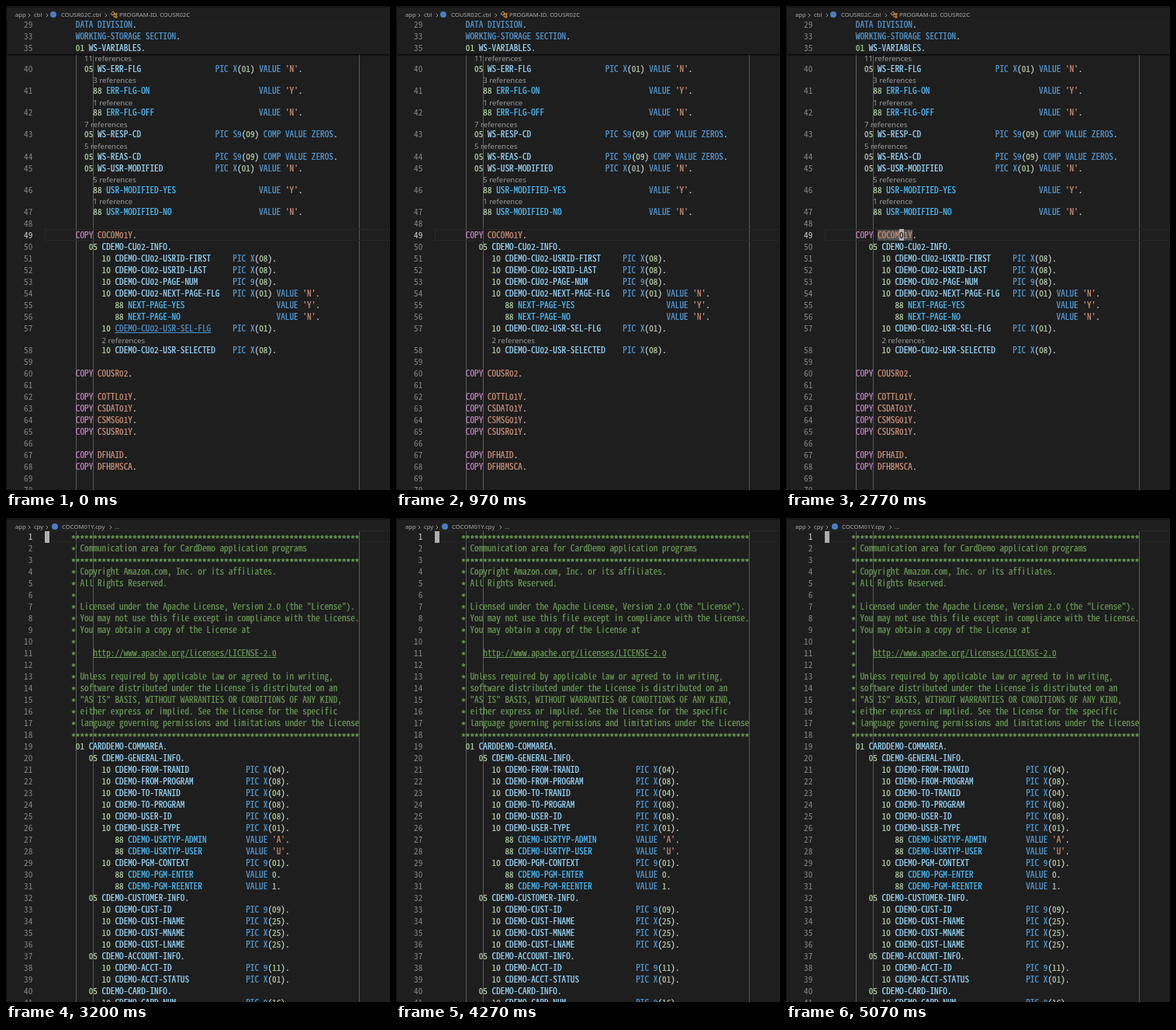
An HTML page for the animation above (5.3 s loop, 495 by 623 pixels).

```html
<!DOCTYPE html>
<html lang="en">
<head>
<meta charset="utf-8">
<title>COBOL editor</title>
<style>
html, body { margin: 0; width: 100%; height: 100%; overflow: hidden; background: #1e1e1e; }
#stage { position: relative; width: 495px; height: 623px; overflow: hidden; background: #1e1e1e; }
#stage div, #stage svg { position: absolute; white-space: pre; }
.view { inset: 0; }
.code, .num { height: 15px; line-height: 15px; color: #d4d4d4;
  font-family: "Noto Sans Mono CJK JP", "Noto Sans Mono CJK SC", "Noto Sans Mono CJK KR", "Noto Sans Mono", monospace;
  font-variant-ligatures: none; font-variant-numeric: lining-nums; font-kerning: none; }
.code { -webkit-text-stroke: .2px currentColor; }
.num { right: 460.7px; color: #858585; }
.num.on { color: #d0d0d0; }
.lens { height: 13px; font: 9.6px/13px "Noto Sans", "Open Sans", sans-serif; color: #999; }
.crumb { top: 4px; font: 7.7px/14px "Noto Sans", "Open Sans", sans-serif; color: #a9a9a9; }
.ruler { width: 1px; bottom: 0; background: #5a5a5a; }
.current { left: 50px; right: 0; height: 13px; border: 1px solid #272727; border-right: 0; }
.sticky { left: 2px; right: 0; top: 16px; height: 46px; background: #1e1e1e; box-shadow: 0 1px 2px #000; }
.dot { width: 8px; height: 8px; border-radius: 50%; background: #4a7cc2; }
.edge { left: 0; width: 1px; }
.word { height: 14px; background: #505050; }
.code.cursor { width: 5.6px; background: #aeafad; color: #1e1e1e; }
.kw { color: #569cd6 } .var { color: #9cdcfe } .const { color: #4fc1ff } .level { color: #b5cea8 }
.str { color: #ce9178 } .ctl { color: #c586c0 } .note { color: #6a9955 }
.note u, .link { text-decoration: underline; text-underline-offset: 1px; }
.star { position: relative; top: 3px; font-weight: bold; }
.menu { left: 145px; top: 273px; width: 223px; height: 380px; background: #1f1f1f; border: 1px solid #454545;
  border-radius: 3px; box-shadow: 0 2px 8px #0008; font: 7.9px/16px "Noto Sans", "Open Sans", sans-serif; color: #ccc; }
.item { left: 3px; right: 3px; height: 16px; border-radius: 3px; }
.item span { position: absolute; left: 14.5px; }
.item span + span { left: auto; right: 15.5px; }
.sep { left: 0; right: 0; height: 1px; background: #454545; }

.view, .word, .cursor, .menu, .hover, .link { animation: 5300ms step-end infinite; }
#first { animation-name: first; }
#second { animation-name: second; }
.word, #first .cursor { animation-name: picked; }
#second .cursor { animation-name: blink; }
.menu { animation-name: menu; }
.hover { animation-name: hover; }
.link { animation-name: link; }
@keyframes first { 0% { visibility: visible } 54.151%, 100% { visibility: hidden } }
@keyframes second { 0% { visibility: hidden } 54.151%, 100% { visibility: visible } }
@keyframes picked { 0%, 54.151%, 100% { visibility: hidden } 25.849% { visibility: visible } }
@keyframes menu { 0%, 52.264%, 100% { visibility: hidden } 27.736% { visibility: visible } }
@keyframes hover { 0%, 52.264%, 100% { background: transparent; color: #ccc } 35.283% { background: #04395e; color: #fff } }
@keyframes blink {
  0%, 62.83%, 83.302% { visibility: hidden }
  54.151%, 73.019%, 93.019%, 100% { visibility: visible }
}
@keyframes link {
  0% { color: #4e94ce; text-decoration-color: #4e94ce }
  .566%, 100% { color: #9cdcfe; text-decoration-color: transparent }
}
</style>
</head>
<body>
<div id="stage">
  <div class="view" id="first"></div>
  <div class="view" id="second"></div>
  <div style="left:0;right:0;top:0;height:2px;background:#161616"></div>
  <div class="edge" style="top:0;bottom:0;background:#131313"></div>
</div>
<script>
const CH = 5.625, LEFT = 50.4, TOP = 15.8, ROW = 15, LENS = 13.2;
const col = n => LEFT + n * CH;

// Both listings start at column 6.
const program = `   05 WS-ERR-FLG                 PIC X(01) VALUE 'N'.
     88 ERR-FLG-ON                         VALUE 'Y'.
     88 ERR-FLG-OFF                        VALUE 'N'.
   05 WS-RESP-CD                 PIC S9(09) COMP VALUE ZEROS.
   05 WS-REAS-CD                 PIC S9(09) COMP VALUE ZEROS.
   05 WS-USR-MODIFIED            PIC X(01) VALUE 'N'.
     88 USR-MODIFIED-YES                   VALUE 'Y'.
     88 USR-MODIFIED-NO                    VALUE 'N'.

 COPY COCOM01Y.
    05 CDEMO-CU02-INFO.
       10 CDEMO-CU02-USRID-FIRST     PIC X(08).
       10 CDEMO-CU02-USRID-LAST      PIC X(08).
       10 CDEMO-CU02-PAGE-NUM        PIC 9(08).
       10 CDEMO-CU02-NEXT-PAGE-FLG   PIC X(01) VALUE 'N'.
          88 NEXT-PAGE-YES                     VALUE 'Y'.
          88 NEXT-PAGE-NO                      VALUE 'N'.
       10 CDEMO-CU02-USR-SEL-FLG     PIC X(01).
       10 CDEMO-CU02-USR-SELECTED    PIC X(08).

 COPY COUSR02.

 COPY COTTL01Y.
 COPY CSDAT01Y.
 COPY CSMSG01Y.
 COPY CSUSR01Y.

 COPY DFHAID.
 COPY DFHBMSCA.

`.split('\n');

const stars = '*'.repeat(66);
const copybook = `${stars}
* Communication area for CardDemo application programs
${stars}
* Copyright Amazon.com, Inc. or its affiliates.
* All Rights Reserved.
*
* Licensed under the Apache License, Version 2.0 (the "License").
* You may not use this file except in compliance with the License.
* You may obtain a copy of the License at
*
*    http://www.apache.org/licenses/LICENSE-2.0
*
* Unless required by applicable law or agreed to in writing,
* software distributed under the License is distributed on an
* "AS IS" BASIS, WITHOUT WARRANTIES OR CONDITIONS OF ANY KIND,
* either express or implied. See the License for the specific
* language governing permissions and limitations under the License
${stars}
 01 CARDDEMO-COMMAREA.
    05 CDEMO-GENERAL-INFO.
       10 CDEMO-FROM-TRANID             PIC X(04).
       10 CDEMO-FROM-PROGRAM            PIC X(08).
       10 CDEMO-TO-TRANID               PIC X(04).
       10 CDEMO-TO-PROGRAM              PIC X(08).
       10 CDEMO-USER-ID                 PIC X(08).
       10 CDEMO-USER-TYPE               PIC X(01).
          88 CDEMO-USRTYP-ADMIN         VALUE 'A'.
          88 CDEMO-USRTYP-USER          VALUE 'U'.
       10 CDEMO-PGM-CONTEXT             PIC 9(01).
          88 CDEMO-PGM-ENTER            VALUE 0.
          88 CDEMO-PGM-REENTER          VALUE 1.
    05 CDEMO-CUSTOMER-INFO.
       10 CDEMO-CUST-ID                 PIC 9(09).
       10 CDEMO-CUST-FNAME              PIC X(25).
       10 CDEMO-CUST-MNAME              PIC X(25).
       10 CDEMO-CUST-LNAME              PIC X(25).
    05 CDEMO-ACCOUNT-INFO.
       10 CDEMO-ACCT-ID                 PIC 9(11).
       10 CDEMO-ACCT-STATUS             PIC X(01).
    05 CDEMO-CARD-INFO.
       10 CDEMO-CARD-NUM                PIC 9(16).`.split('\n');

const lenses = { 40: 11, 41: 3, 42: 1, 43: 7, 44: 5, 46: 5, 47: 1, 58: 2 };

const menu = [
  'Go to Definition|F12', 'Go to References|Shift+F12', 'Peek|>', '',
  'Find All References|Shift+Alt+F12', '',
  'Rename Symbol|F2', 'Change All Occurrences|Ctrl+F2', 'Refactor...|Ctrl+Shift+R', '',
  'Cut|Ctrl+X', 'Copy|Ctrl+C', 'Paste|Ctrl+V', '',
  'Git: View File History|Alt+H', 'Git: View Line History|', '',
  'Go to Data Division|Ctrl+Alt+D', 'Go to Next Division/Section|Ctrl+Alt+.',
  'Go to Previous Division/Section|Ctrl+Alt+,', 'Go to Procedure Division|Ctrl+Alt+P',
  'Go to Working-Storage Section|Ctrl+Alt+W', '',
  'Command Palette...|Ctrl+Shift+P', '',
  'Open in Tavnor|>'
];

const first = document.getElementById('first');
const second = document.getElementById('second');

function add(parent, cls, style, html = '') {
  const el = document.createElement('div');
  el.className = cls;
  for (const key in style) el.style[key] = typeof style[key] === 'number' ? style[key] + 'px' : style[key];
  el.innerHTML = html;
  return parent.appendChild(el);
}

const span = (cls, text) => `<span class="${cls}">${text}</span>`;
const keyword = /^(PIC|VALUE|COMP|ZEROS|DATA|DIVISION|WORKING-STORAGE|SECTION|X|S?9)$/;

function paint(line) {
  if (line[0] === '*') {
    return span('note', line.replace(/\*+/, s => span('star', s)).replace(/http\S+/, '<u>$&</u>'));
  }
  const head = line.trim().slice(0, 2);
  const name = { CO: 'str', 88: 'const' }[head] || 'var';
  return line.replace(/'.'|S?9(?=\()|[A-Z][\w-]*|\d+/g, word => {
    if (word[0] === "'") return span('str', word);
    if (word === 'COPY') return span('ctl', word);
    if (keyword.test(word)) return span('kw', word);
    if (/^\d/.test(word)) return span('level', word);
    return span(word.endsWith('USR-SEL-FLG') ? 'link' : name, word);
  });
}

function addLine(view, top, num, line, active) {
  add(view, active ? 'num on' : 'num', { top }, num);
  add(view, 'code', { left: col(6), top }, paint(line));
}

function addRulers(view, top) {
  for (const n of [7, 11, 72]) add(view, 'ruler', { left: Math.round(col(n)), top });
}

function chevron(parent, x, y, size) {
  add(parent, '', { left: x, top: y - size }, `<svg width="${size + 2}" height="${size * 2}" fill="none" stroke="#a0a0a0"
    stroke-width=".9"><path d="M.7 .7L${size} ${size}L.7 ${size * 2 - 0.7}"/></svg>`);
}

function addCrumbs(view, parts, arrows, dot) {
  for (const [left, text] of parts) add(view, 'crumb', { left }, text);
  for (const x of arrows) chevron(view, x, 11.5, 3);
  add(view, 'dot', { left: dot, top: 7 });
}

function buildProgram() {
  addRulers(first, 62);
  let top = 72.7;
  program.forEach((line, i) => {
    const num = 40 + i, count = lenses[num];
    if (count) {
      if (i) top += LENS;
      const indent = line.search(/\S/);
      add(first, 'lens', { left: col(6 + indent), top: top - LENS + 1.7 }, `${count} reference${count > 1 ? 's' : ''}`);
    }
    if (num === 49) {
      add(first, 'current', { top: 287 });
      add(first, 'word', { left: col(12), top: 288, width: CH * 8 });
    }
    addLine(first, top, num, line, num === 49);
    top += ROW;
  });
  add(first, 'code cursor', { left: col(17), top: 287 }, '0');

  add(first, 'sticky', {});
  addLine(first, TOP, 29, ' DATA DIVISION.');
  addLine(first, TOP + ROW, 33, ' WORKING-STORAGE SECTION.');
  addLine(first, TOP + ROW * 2, 35, ' 01 WS-VARIABLES.');
  addCrumbs(first, [[12, 'app'], [36, 'cbl'], [71, 'COUSR02C.cbl'], [146, 'PROGRAM-ID. COUSR02C']], [28, 51, 127], 57);
  add(first, '', { left: 134, top: 6 }, `<svg width="10" height="10" fill="none" stroke="#d7913c" stroke-width="1">
    <path d="M1 4L4 1L6 3L3 6ZM5 4.5H7M5 4.5V8H7M7 3.5H9V5.5H7ZM7 7H9V9H7Z"/></svg>`);
  add(first, 'edge', { top: 64, height: 14, background: '#34648c' });
}

function buildMenu() {
  const box = add(first, 'menu', {});
  let y = 2.5;
  menu.forEach((entry, i) => {
    if (!entry) {
      add(box, 'sep', { top: y + 3 });
      y += 7.15;
      return;
    }
    const [label, key] = entry.split('|');
    add(box, i ? 'item' : 'item hover', { top: y }, `<span>${label}</span><span>${key === '>' ? '' : key}</span>`);
    if (key === '>') chevron(box, 208.5, y + 8, 3.5);
    y += 16.15;
  });
}

function buildCopybook() {
  addRulers(second, 17);
  add(second, 'current', { top: 16 });
  copybook.forEach((line, i) => addLine(second, TOP + i * ROW, i + 1, line, i === 0));
  add(second, 'code cursor', { left: LEFT, top: 17 });
  addCrumbs(second, [[12, 'app'], [36, 'cpy'], [72, 'COCOM01Y.cpy'], [140, '…']], [28, 51, 133], 59);
  add(second, 'edge', { top: 147, height: 14, background: '#555' });
}

// Size the code font so that one character fills one column.
const pen = document.createElement('canvas').getContext('2d');
buildProgram();
buildMenu();
buildCopybook();
const codeRows = document.querySelectorAll('.code, .num');
pen.font = '100px ' + getComputedStyle(codeRows[0]).fontFamily;
const size = 100 * CH / pen.measureText('0').width;
for (const row of codeRows) row.style.fontSize = size + 'px';
</script>
</body>
</html>
```
